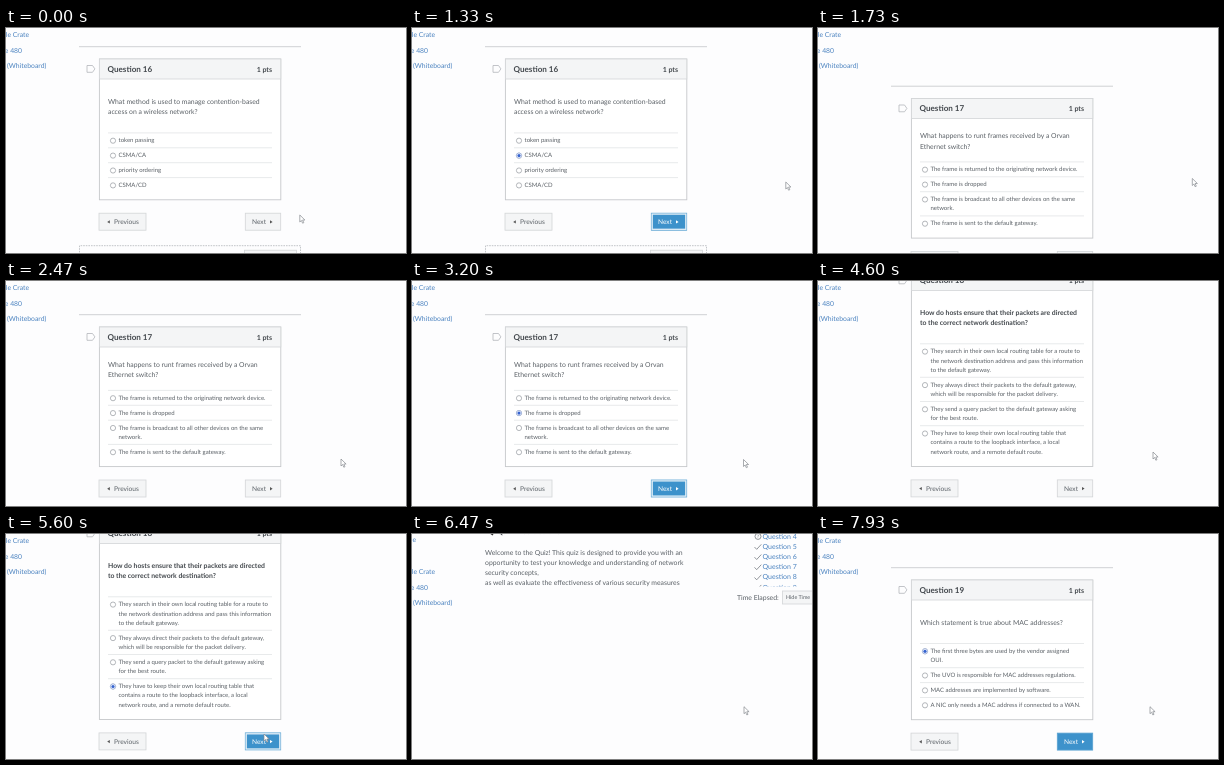
These frames come from a looping animation (400 px wide and 225 px high, 8 s). An HTML page:

```html
<!DOCTYPE html>
<html lang="en">
<head>
<meta charset="utf-8">
<style>
  html, body { margin: 0; width: 100%; height: 100%; overflow: hidden; background: #fdfdfe; }
  svg { display: block; width: 100vw; height: 100vh; filter: blur(.3px); }
  text { font-family: Lato, "Open Sans", sans-serif; text-rendering: geometricPrecision; fill: #5a6066; }
  .bold { font-weight: 700; fill: #43484d; }
  .link { fill: #4a82bf; }
  .rule { stroke: #c4c6c9; stroke-width: .8; }
  .thin { stroke: #dfe1e3; stroke-width: .7; }
  .box { fill: #f4f5f6; stroke: #d3d5d8; stroke-width: .8; }
  .icon { fill: none; stroke: #777c82; stroke-width: .8; }
  .flag { fill: none; stroke: #b4b7bb; stroke-width: .8; }
</style>
</head>
<body>
<svg id="stage" viewBox="0 0 400 225" preserveAspectRatio="none"></svg>
<script>
const LOOP = 8000, SCROLL = 260, SCROLL_TIME = 400;

// top: resting card position, gap: card top to first prompt line, optionGap: prompt to first option
const questions = [
  { number: 16, top: 31, gap: 42.4, optionGap: 18, answer: 1, load: -9000, scroll: -9000, select: 100, click: 450,
    prompt: ["What method is used to manage contention-based", "access on a wireless network?"],
    options: [["token passing"], ["CSMA/CA"], ["priority ordering"], ["CSMA/CD"]] },
  { number: 17, top: 46, gap: 37.4, optionGap: 12.5, answer: 1, load: 1390, scroll: 1513, select: 2700, click: 3000,
    prompt: ["What happens to runt frames received by a Orvan", "Ethernet switch?"],
    options: [["The frame is returned to the originating network device."], ["The frame is dropped"],
      ["The frame is broadcast to all other devices on the same", "network."],
      ["The frame is sent to the default gateway."]] },
  { number: 18, top: -10.5, gap: 41.8, optionGap: 18, answer: 3, load: 3600, scroll: 3750, select: 4750, click: 5600, bold: true,
    prompt: ["How do hosts ensure that their packets are directed", "to the correct network destination?"],
    options: [["They search in their own local routing table for a route to",
        "the network destination address and pass this information", "to the default gateway."],
      ["They always direct their packets to the default gateway,", "which will be responsible for the packet delivery."],
      ["They send a query packet to the default gateway asking", "for the best route."],
      ["They have to keep their own local routing table that",
        "contains a route to the loopback interface, a local", "network route, and a remote default route."]] },
  { number: 19, top: 46, gap: 42.4, optionGap: 18, answer: 0, load: 6200, scroll: 6500, select: 7860, click: Infinity,
    prompt: ["Which statement is true about MAC addresses?"],
    options: [["The first three bytes are used by the vendor assigned", "OUI."],
      ["The UVO is responsible for MAC addresses regulations."],
      ["MAC addresses are implemented by software."],
      ["A NIC only needs a MAC address if connected to a WAN."]] }
];

// time, x, y of the pointer tip
const pointerPath = [
  [0, 293.8, 187], [150, 293.8, 187], [400, 258, 198], [550, 258, 198], [830, 373.8, 154],
  [1400, 373.8, 154], [1700, 374.3, 150.5], [1950, 374.3, 150.5], [2350, 335, 178],
  [2750, 335, 178], [2950, 258, 205], [3030, 258, 205], [3190, 331.5, 178.5], [3600, 331.5, 178.5],
  [4300, 335, 171], [5300, 335, 171], [5550, 258, 200], [5680, 258, 200], [6000, 332, 172.7], [LOOP, 332, 172.7]
];

// y is the visual middle of the line
const text = (x, y, size, content, kind = "", anchor = "start") =>
  `<text x="${x}" y="${y + size * .35}" font-size="${size}" class="${kind}" text-anchor="${anchor}">${content}</text>`;
const line = (x1, x2, y, kind) => `<path class="${kind}" d="M${x1} ${y}H${x2}"/>`;
const box = (x, y, w, h) => `<rect class="box" x="${x}" y="${y}" width="${w}" height="${h}"/>`;

function questionMarkup(q) {
  let body = "", y = q.gap;
  for (const row of q.prompt) {
    body += text(102, y, 6.85, row, q.bold ? "bold" : "");
    y += 10.4;
  }
  y += q.optionGap;
  q.options.forEach((rows, i) => {
    body += line(102, 266, y - 7.3, "thin");
    body += `<circle cx="107" cy="${y + .5}" r="2.6" fill="#fff" stroke="#969a9f" stroke-width=".7"/>`;
    if (i === q.answer)
      body += `<g class="chosen"><circle cx="107" cy="${y + .5}" r="2.6" fill="#fff" stroke="#8ea6dc" stroke-width=".7"/>
        <circle cx="107" cy="${y + .5}" r="1.6" fill="#3563cf"/></g>`;
    rows.forEach((row, n) => body += text(112.5, y + n * 9.3, 6, row));
    y += (rows.length - 1) * 9.3 + 14.9;
  });
  const buttons = y + 13.4;
  return `${line(73, 295, -12.3, "rule")}
    <path class="flag" d="M81 6.5h5.5l2.4 3.4l-2.4 3.4h-5.5z"/>
    <rect x="93.4" y="0" width="181.4" height="${y}" fill="#fff" stroke="#c6c8cb" stroke-width=".9"/>
    ${box(93.4, 0, 181.4, 20)}
    ${text(101.5, 9.7, 8.1, `Question ${q.number}`, "bold")}${text(266, 10.2, 7, "1 pts", "bold", "end")}
    ${body}
    ${box(93, buttons, 47, 17)}
    <path d="M103.8 ${buttons + 7}v3.4l-2.6-1.7z" fill="#555"/>${text(108, buttons + 8.7, 6.6, "Previous")}
    <g class="next">${box(239.3, buttons, 35.4, 17)}
    <rect class="ring" x="240.2" y="${buttons + .9}" width="33.6" height="15.2" fill="none" stroke="#e4f0f8" stroke-width="1.3"/>
    ${text(246, buttons + 8.7, 6.6, "Next")}
    <path d="M264 ${buttons + 7}v3.4l2.6-1.7z" fill="#555"/></g>
    <path d="M73.5 ${buttons + 60}V${buttons + 32.5}H294.5v30" fill="none" stroke="#b3b6ba" stroke-width=".8" stroke-dasharray="1.6 1"/>
    ${box(238.5, buttons + 37, 52, 17)}`;
}

function introMarkup() {
  const rows = ["Welcome to the Quiz! This quiz is designed to provide you with an",
    "opportunity to test your knowledge and understanding of network", "security concepts,",
    "as well as evaluate the effectiveness of various security measures"];
  let list = "";
  for (let i = 0; i < 6; i++) {
    const y = 2.4 + i * 10.15;
    list += text(350.5, y, 7, `Question ${i + 4}`, "link");
    list += i ? `<path class="icon" d="M342.5 ${y + .5}l2.2 2.3l4.6-5"/>`
      : `<circle class="icon" cx="346" cy="${y}" r="3"/>${text(346, y, 4.5, "?", "", "middle")}`;
  }
  return `<path d="M77 -2l4 3" stroke="#333" stroke-width="1.5"/>${text(84, -2.6, 8.5, "Quiz Instructions", "bold")}
    ${rows.map((row, i) => text(73, 18.3 + i * 10.2, 6.85, row)).join("")}
    <clipPath id="listClip"><rect x="335" y="-20" width="65" height="72.5"/></clipPath>
    <g clip-path="url(#listClip)">${list}</g>
    ${text(325, 63.3, 6.9, "Time Elapsed:")}${box(370.5, 57, 40, 13)}${text(374, 63.5, 5.4, "Hide Time")}`;
}

const stage = document.getElementById("stage");
stage.innerHTML = `<rect width="400" height="225" fill="#fdfdfe"/>
  <g id="intro">${introMarkup()}</g>
  ${questions.map(q => `<g class="question">${questionMarkup(q)}</g>`).join("")}
  <g id="sidebar">${text(4, -25, 6.8, "le", "link", "end")}${text(23, 6.4, 6.8, "le Crate", "link", "end")}
    ${text(16, 22.2, 6.8, "e 480", "link", "end")}${text(1, 38, 6.8, "(Whiteboard)", "link")}</g>
  <path id="pointer" d="M0 0v7l1.6-1.5l1.2 2.7l1.2-.5l-1.2-2.7h2.3z" fill="#fff" stroke="#85898e" stroke-width=".7"/>`;

const views = [...stage.querySelectorAll(".question")].map(group => ({
  group, chosen: group.querySelector(".chosen"), ring: group.querySelector(".ring"),
  face: group.querySelector(".next rect"), inks: group.querySelectorAll(".next text, .next path")
}));
const intro = document.getElementById("intro");
const sidebar = document.getElementById("sidebar");
const pointer = document.getElementById("pointer");

const clamp = v => Math.max(0, Math.min(1, v));
const show = (node, visible) => node.setAttribute("visibility", visible ? "inherit" : "hidden");
const move = (node, x, y) => node.setAttribute("transform", `translate(${x} ${y})`);

function pointerAt(t) {
  const i = pointerPath.findIndex(p => p[0] > t);
  const [t0, x0, y0] = pointerPath[i - 1], [t1, x1, y1] = pointerPath[i];
  const u = (t - t0) / (t1 - t0), k = u * u * (3 - 2 * u);
  return [x0 + (x1 - x0) * k, y0 + (y1 - y0) * k];
}

function draw(t) {
  const current = questions.findLastIndex(q => t >= q.load);
  const q = questions[current], view = views[current];
  const left = SCROLL * (1 - clamp((t - q.scroll) / SCROLL_TIME)) ** 3;
  const answered = t >= q.select;
  views.forEach((v, i) => show(v.group, i === current));
  move(view.group, 0, q.top + left);
  move(intro, 0, left - SCROLL);
  move(sidebar, 0, Math.max(0, 31 - (SCROLL - left)));
  show(view.chosen, answered);
  show(view.ring, t >= q.click);
  view.face.style.fill = answered ? "#3d92cb" : "";
  view.face.style.stroke = answered ? "#5ba3d2" : "";
  view.inks.forEach(ink => ink.style.fill = answered ? "#fff" : "");
  move(pointer, ...pointerAt(t));
}

function tick() {
  draw(performance.now() % LOOP);
  requestAnimationFrame(tick);
}
tick();
</script>
</body>
</html>
```
